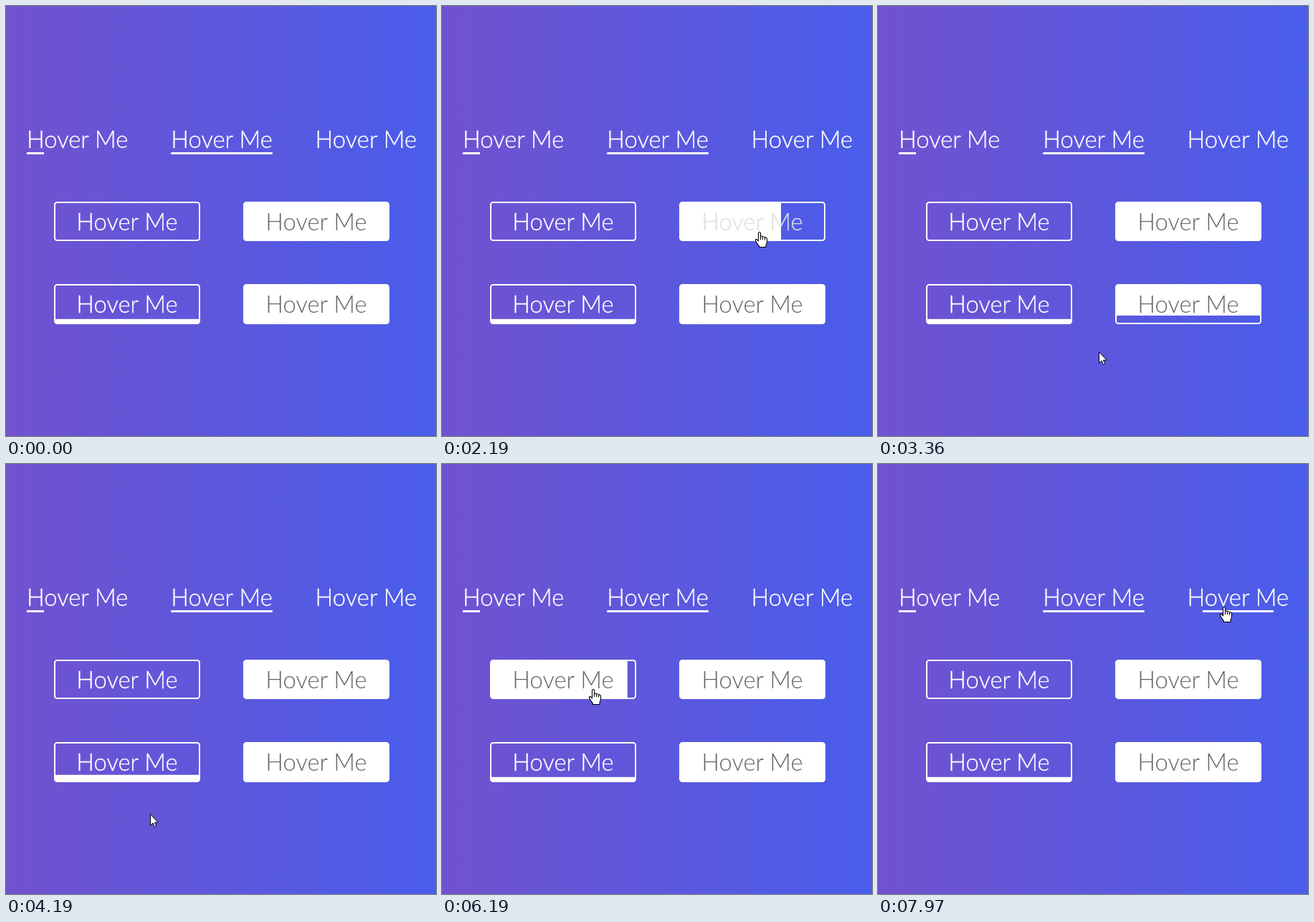
An HTML page that plays this animation: 600x600 px, repeating every 8 s.

```html
<!DOCTYPE html>
<html lang="en">
<head>
<meta charset="utf-8">
<title>Hover effects</title>
<style>
html, body { margin: 0; width: 100%; height: 100%; overflow: hidden; background: #5f57dc; }
svg { display: block; width: 100vw; height: 100vh; }
text { font: 300 33px Lato, "Lato Light", sans-serif; fill: #fff; stroke: #fff; stroke-width: .35px; }
</style>
</head>
<body>
<svg viewBox="0 0 600 600">
  <defs>
    <linearGradient id="bg">
      <stop offset="0" stop-color="#7152cf"/>
      <stop offset="1" stop-color="#495deb"/>
    </linearGradient>
  </defs>
  <rect width="600" height="600" fill="url(#bg)"/>
  <g id="items"></g>
  <g id="arrow" fill="#fff" stroke="#000" stroke-linejoin="round">
    <path d="M.5 .8V16.2L4 13L6.4 18.4L8.8 17.4L6.4 12.2H11.2Z"/>
  </g>
  <g id="hand" fill="#fff" stroke="#000" stroke-width="1.1" stroke-linejoin="round">
    <path d="M-1.5 2Q-1.5 .5 0 .5T1.5 2V6.3Q3.5 5.4 4.5 7Q6.4 6.2 7.5 8Q10 7.5 10.5 10V14Q10.4 16 9 18.5V21.5H-.5V20Q-3.6 16.5 -5.4 12.8Q-6 10.4 -4.4 10.4Q-2.9 10.8 -1.5 13Z"/>
    <path d="M1.5 6V11M4.5 7.2V11M7.5 8.2V11.5" fill="none"/>
  </g>
</svg>
<script>
const LOOP = 8000, FILL = 500, TINT = 205, TEXT_W = 141.5, GREY = 100;
const $ = id => document.getElementById(id);
const mix = (a, b, p) => a + (b - a) * p;

function set(el, attrs) {
  for (const k in attrs) el.setAttribute(k, attrs[k]);
}
function add(tag, attrs) {
  const el = document.createElementNS('http://www.w3.org/2000/svg', tag);
  set(el, attrs);
  $('items').appendChild(el);
  return el;
}
function label(x, y) {
  const el = add('text', { x, y });
  el.textContent = 'Hover Me';
  // size the type so that the label is as wide as its link
  el.style.fontSize = (33 * TEXT_W / el.getComputedTextLength()).toFixed(2) + 'px';
  return el;
}

// Turning points of the pointer: time, x, y
const turns = [
  [150, 445, 600], [390, 442, 425], [840, 439, 388.2], [1040, 439, 388.2],
  [1320, 438, 310], [1880, 446, 353], [2230, 443, 314], [2880, 415, 405],
  [3340, 316, 482], [3790, 150, 418], [4060, 200, 498], [4800, 203, 365],
  [4910, 203, 365], [5130, 205, 300], [5660, 211, 352], [5960, 211, 313],
  [6470, 211, 315], [6580, 290, 377], [6880, 298, 172], [7450, 305, 170],
  [7620, 395, 138], [7930, 483, 199]
];

// Sideways at an even pace, up and down in soft swings
function pointer(t) {
  const next = turns.findIndex(k => k[0] > t);
  if (next < 1) return (next ? turns[turns.length - 1] : turns[0]).slice(1);
  const [t0, x0, y0] = turns[next - 1], [t1, x1, y1] = turns[next];
  const u = (t - t0) / (t1 - t0);
  return [mix(x0, x1, u), mix(y0, y1, (1 - Math.cos(Math.PI * u)) / 2)];
}

// Times at which the pointer enters and leaves a box, in turn
function crossings(x, y, w, h) {
  const flips = [];
  for (let t = 0; t < LOOP; t += 5) {
    const [px, py] = pointer(t);
    const inside = px >= x && px <= x + w && py >= y && py <= y + h;
    if (inside !== (flips.length % 2 === 1)) flips.push(t);
  }
  return flips;
}

// CSS "ease": cubic-bezier(.25, .1, .25, 1)
function ease(x) {
  if (x <= 0) return 0;
  if (x >= 1) return 1;
  const curve = (a, b, u) => 3 * a * u * (1 - u) ** 2 + 3 * b * u * u * (1 - u) + u ** 3;
  let lo = 0, hi = 1;
  for (let i = 0; i < 24; i++) {
    const mid = (lo + hi) / 2;
    if (curve(.25, .25, mid) < x) lo = mid; else hi = mid;
  }
  return curve(.1, 1, lo);
}

// Hover transition level; a reversed one takes proportionally less time
function level(flips, t, dur) {
  let from = 0, goal = 0, start = 0;
  const at = now => from === goal ? goal
    : mix(from, goal, ease((now - start) / (dur * Math.abs(goal - from))));
  for (const f of flips) {
    if (f > t) break;
    from = at(f);
    goal = 1 - goal;
    start = f;
  }
  return at(t);
}

// Underline widths at rest and on hover, growing from the left or the centre
function link(x, rest, over, centred) {
  const flips = crossings(x, 165, TEXT_W, 42);
  label(x, 198);
  const bar = add('rect', { y: 204, height: 3, fill: '#fff' });
  return {
    flips,
    draw(t) {
      const width = mix(rest, over, level(flips, t, FILL));
      set(bar, { x: x + (centred ? (TEXT_W - width) / 2 : 0), width });
    }
  };
}

// White fill that grows from one side; rest and over are its shares
function button(x, y, h, side, rest, over) {
  const flips = crossings(x, y, 204, h), inner = h - 4;
  const fill = add('rect', { x: x + 2, y: y + 2, width: 200, height: inner, fill: '#fff' });
  add('rect', {
    x: x + 1, y: y + 1, width: 202, height: h - 2, rx: 3.5,
    fill: 'none', stroke: '#fff', 'stroke-width': 2
  });
  const text = label(x + (204 - TEXT_W) / 2, Math.round(y + h / 2 + 12.4));
  return {
    flips,
    draw(t) {
      const part = mix(rest, over, level(flips, t, FILL));
      if (side === 'left') set(fill, { width: 200 * part });
      else set(fill, {
        height: inner * part,
        y: y + 2 + (side === 'bottom' ? inner * (1 - part) : 0)
      });
      const p = level(flips, t, TINT), dark = rest === 1 ? 1 - p : p;
      const c = Math.round(mix(255, GREY, dark));
      text.style.fill = text.style.stroke = `rgb(${c},${c},${c})`;
      text.style.strokeWidth = mix(.35, 0, dark) + 'px';
    }
  };
}

const parts = [
  link(29, 24, TEXT_W),
  link(230.3, TEXT_W, 0),
  link(431.6, 0, TEXT_W, true),
  button(67, 273, 55, 'left', 0, 1),
  button(331, 273, 55, 'left', 1, 0),
  button(67, 388, 56, 'bottom', .1, 1),
  button(331, 388, 56, 'top', 1, 0)
];

function draw(t) {
  parts.forEach(p => p.draw(t));
  const over = parts.some(p => p.flips.filter(f => f <= t).length % 2);
  const transform = `translate(${pointer(t).map(Math.round).join(' ')})`;
  set($('hand'), { transform, visibility: over ? 'visible' : 'hidden' });
  set($('arrow'), { transform, visibility: over ? 'hidden' : 'visible' });
}

const begin = performance.now();
function tick() {
  draw((performance.now() - begin) % LOOP);
  requestAnimationFrame(tick);
}
tick();
</script>
</body>
</html>
```
